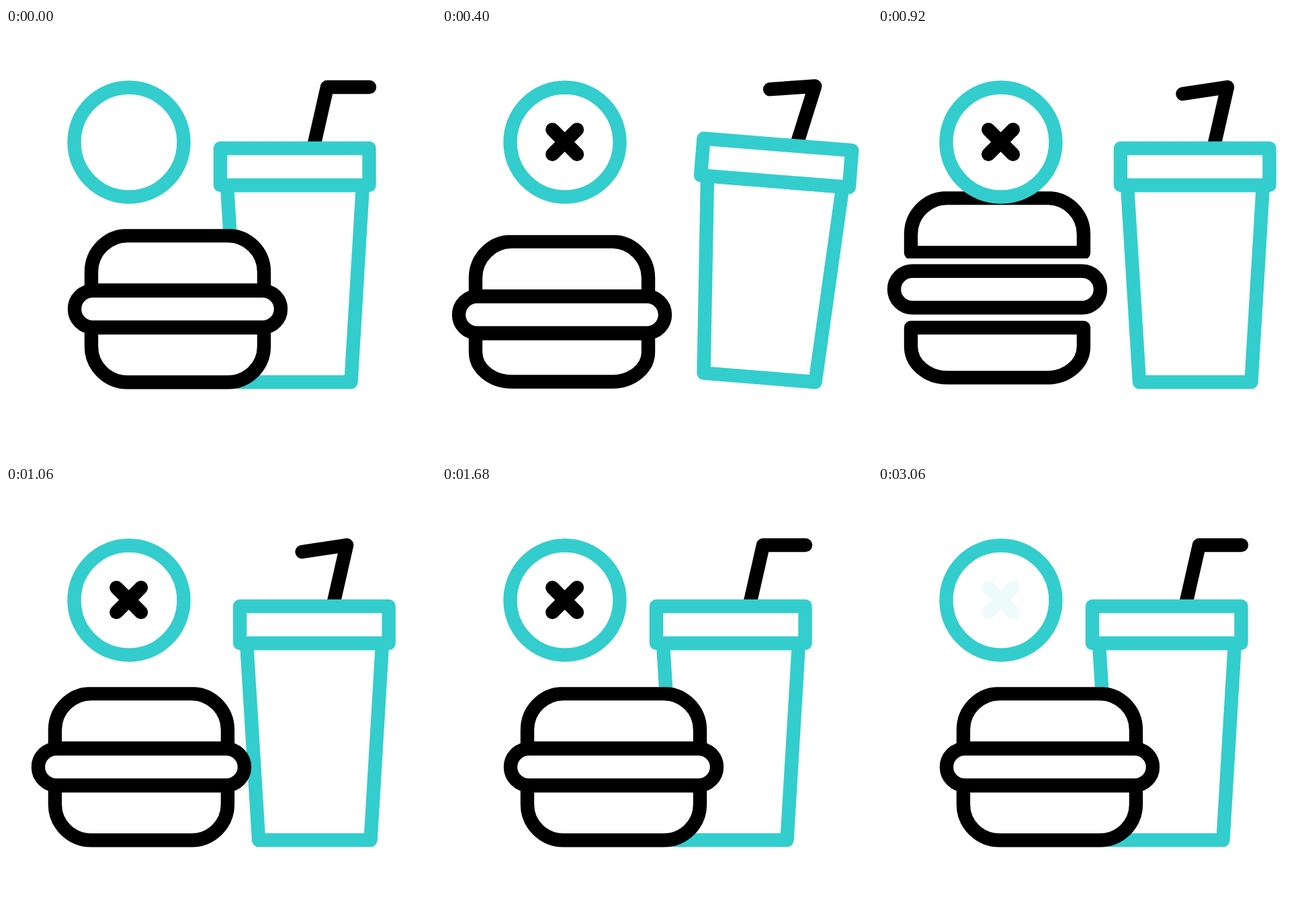
Recreate the animation shown at these times as an HTML page. Size 640 by 640 pixels, loop 3.6 s.

```html
<!DOCTYPE html>
<html lang="en">
<head>
<meta charset="utf-8">
<title>Burger and drink</title>
<style>
  html, body { margin: 0; height: 100%; overflow: hidden; background: #fff; }
  svg { display: block; width: 100%; height: 100%; }
  g { fill: #fff; stroke-width: 20.4; stroke-linecap: round; stroke-linejoin: round; }
  .teal { stroke: #33cdcd; }
  .black { stroke: #000; }
  .open { fill: none; }
</style>
</head>
<body>
<svg viewBox="0 0 640 640">
  <clipPath id="bunClip"><rect x="100" y="299.3" width="320" height="99.7"/></clipPath>
  <g id="cup">
    <path id="straw" class="black open"/>
    <path class="teal" d="M329 234L347 527H513.5L531 234Z"/>
    <path class="teal" d="M319 179H540.5V234H319Z"/>
  </g>
  <g id="burger" class="black">
    <path id="base"/>
    <g id="top"><path clip-path="url(#bunClip)"
      d="M127 390.5V363A54 54 0 0 1 181 309H330A54 54 0 0 1 384 363V390.5Z"/></g>
    <rect id="patty" x="102" y="391" width="307" height="54.5" rx="27.25"/>
  </g>
  <g class="open">
    <circle class="teal" cx="183" cy="170" r="81.5"/>
    <path id="cross" d="M164.3 151.3L201 188M201 151.3L164.3 188"/>
  </g>
</svg>
<script>
const LOOP = 3600;
const el = id => document.getElementById(id);
const set = (id, name, value) => el(id).setAttribute(name, value);
const linear = p => p;
const smooth = p => p * p * (3 - 2 * p);

// Value at time t along [time, value] keys
function at(t, keys, ease = linear) {
  let [t0, v0] = keys[0];
  for (const [t1, v1] of keys) {
    if (t < t1) return t <= t0 ? v0 : v0 + (v1 - v0) * ease((t - t0) / (t1 - t0));
    [t0, v0] = [t1, v1];
  }
  return v0;
}

// Vertical hop: crouch, rise, peak, fall, rest
const HOP = [240, 440, 640, 760, 920, 980];
const hop = (t, ...ys) => at(t, HOP.map((time, i) => [time, [0, ...ys, 0][i]]));

function draw(t) {
  const cupX = at(t, [[20, 0], [240, 42], [980, 42], [1200, 0]], smooth);
  const tilt = at(t, [[260, 0], [480, 7.15], [680, 0]]);
  set('cup', 'transform', `translate(${cupX}) rotate(${tilt} 514 527)`);

  const bend = at(t, [[20, 0], [380, 1], [1200, 1], [1680, 0]], smooth);
  set('straw', 'd', `M458 176L478 88L${541 - 129.5 * bend} ${88 + 10 * bend}`);

  const burgerX = at(t, [[20, 0], [240, -77], [680, -77], [900, -78], [980, -78], [1200, 0]], smooth);
  set('burger', 'transform', `translate(${burgerX})`);
  set('top', 'transform', `translate(0 ${hop(t, 11, -39, -69, -57)})`);
  set('patty', 'transform', `translate(0 ${hop(t, 10.5, -37, -66, -29.7)})`);

  const rim = 446 + hop(t, 10.5, -35, -62, 0);
  const floor = 527.3 + hop(t, -1, -26, -55, -7);
  const ry = floor - rim - 28;
  set('base', 'd', `M127 ${rim}v28A54 ${ry} 0 0 0 181 ${floor}H330A54 ${ry} 0 0 0 384 ${rim + 28}v-28Z`);

  const fade = at(t, [[2880, 0], [3060, 1]]);
  set('cross', 'stroke', `rgb(${[238, 251, 251].map(c => Math.round(c * fade))})`);
  set('cross', 'opacity', at(t, [[20, 0], [200, 1]]));
}

function tick() {
  draw(performance.now() % LOOP);
  requestAnimationFrame(tick);
}
draw(0);
requestAnimationFrame(tick);
</script>
</body>
</html>
```
